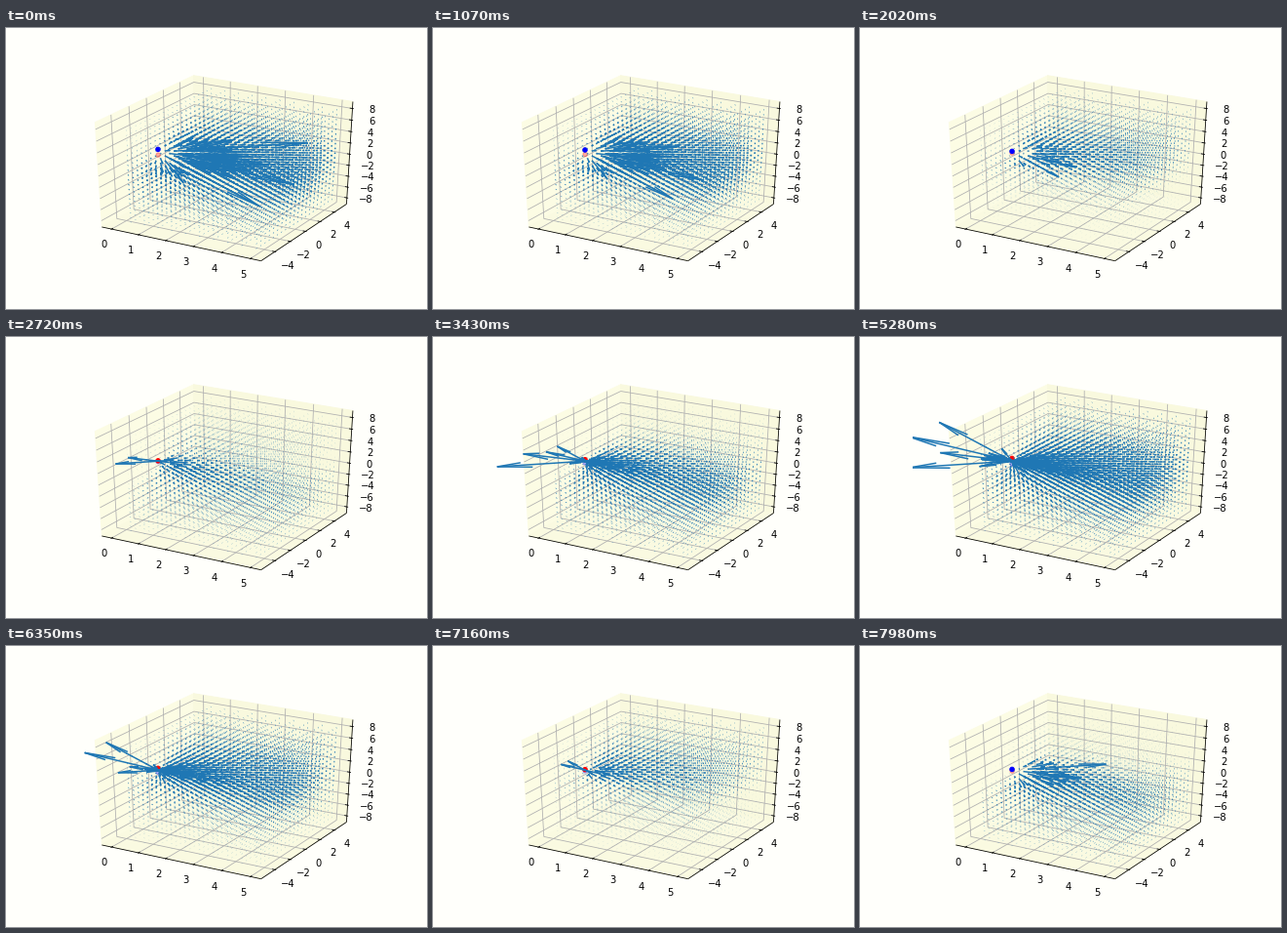
A matplotlib script for the animation above (8 s loop, 432 px wide and 288 px high).

```python
import numpy as np
import matplotlib.pyplot as plt
from matplotlib.animation import FuncAnimation
from matplotlib.collections import LineCollection
from matplotlib.patches import PathPatch, Polygon, Rectangle
from matplotlib.path import Path

W, H = 432, 288
FRAMES, STEP = 250, 32
PERIOD = 10000
BLUE = "#1f77b4"
PAPER = "#fffffb"
LOW = np.array([-0.25, -5.5, -8.8])
SPAN = np.array([5.5, 11.0, 17.6])
EDGE = 0.5 + 1 / 48
LABEL = EDGE + 0.0833
LEFT, BOTTOM, WIDE, TALL = 54, 252, 334.8, 217.44

ELEV, AZIM = np.radians([30, -60])
CE, SE, CA, SA = np.cos(ELEV), np.sin(ELEV), np.cos(AZIM), np.sin(AZIM)
RIGHT = np.array([-SA, CA, 0])
UP = np.array([-SE * CA, -SE * SA, CE])
NEAR = np.array([CE * CA, CE * SA, SE])


def project(p):
    """Unit-cube points, centred on zero, to stage pixels."""
    p = np.asarray(p, float)
    depth = 10 - p @ NEAR
    x = LEFT + WIDE * (p @ RIGHT / depth + 0.095) / 0.185
    y = BOTTOM - TALL * (p @ UP / depth + 0.095) / 0.185
    return np.stack([x, y], -1)


def to_cube(p):
    return (np.asarray(p, float) - LOW) / SPAN - 0.5


def point(axis, value, first, second):
    """A cube point with value on axis and the rest in order."""
    p = [first, second]
    p.insert(axis, value)
    return p


fig = plt.figure(figsize=(W / 72, H / 72), dpi=72, facecolor=PAPER)
ax = fig.add_axes([0, 0, 1, 1])
ax.set_xlim(0, W)
ax.set_ylim(H, 0)
ax.axis("off")

E = EDGE
panes = [
    ([(-E, -E, -E), (-E, E, -E), (-E, E, E), (-E, -E, E)], "#fcfce4"),
    ([(-E, E, -E), (E, E, -E), (E, E, E), (-E, E, E)], "#f9f9de"),
    ([(-E, -E, -E), (E, -E, -E), (E, E, -E), (-E, E, -E)], "#fafae1"),
]
for corners, tone in panes:
    ax.add_patch(Polygon(project(corners), fc=tone, ec=tone, lw=1, zorder=0))

# per axis: tick values, fixed edge, far corner of the grid, tick direction
axes3d = [
    (range(0, 6), (-E, -E), [(E, -E), (E, E)], 1),
    (range(-4, 5, 2), (E, -E), [(-E, -E), (-E, E)], 0),
    (range(-8, 9, 2), (E, E), [(-E, E), (-E, -E)], 0),
]
grid, ticks = [], []
for k, (values, edge, far, tick_dir) in enumerate(axes3d):
    ticks.append(project([point(k, -E, *edge), point(k, E, *edge)]))
    for v in values:
        c = (v - LOW[k]) / SPAN[k] - 0.5
        base = point(k, c, *edge)
        grid.append(project([base] + [point(k, c, *f) for f in far]))
        inner, outer = list(base), list(base)
        side = np.sign(base[tick_dir])
        inner[tick_dir] -= side * 0.2 / 12
        outer[tick_dir] += side * 0.1 / 12
        ticks.append(project([inner, outer]))
        x, y = project(point(k, c, *(np.sign(edge) * LABEL)))
        ax.text(x, y + 3.3, str(v).replace("-", "\u2212"), size=10,
                family="DejaVu Sans", ha="center", va="center")
ax.add_collection(LineCollection(grid, colors="#b0b0b0", lw=0.8, zorder=1))
ax.add_collection(LineCollection(ticks, colors="k", lw=0.8, zorder=2))

# lattice of arrow bases
base = np.stack(np.meshgrid(np.linspace(0.5, 5, 10), np.linspace(-5, 5, 20),
                            np.linspace(-8, 8, 20), indexing="ij"), -1).reshape(-1, 3)
dist = np.linalg.norm(base, axis=1)
unit = base / dist[:, None]
rise = unit[:, 2]
decay = np.exp(0.7 - dist)
lag = 0.1 * decay + rise * (0.85 * decay - 0.5)
reach = 2.88 / dist ** 2 * (1 + 0.11 * rise * decay)
base_px = project(to_cube(base))
flat = np.hypot(unit[:, 0], unit[:, 1])
turn = np.stack([-unit[:, 0] * rise / flat, -unit[:, 1] * rise / flat, flat], -1)
C15, S15 = np.cos(np.pi / 12), np.sin(np.pi / 12)

clip = Rectangle((LEFT, BOTTOM - TALL), WIDE, TALL, transform=ax.transData)
CHUNKS = 16
strokes = []
for _ in range(CHUNKS):
    stroke = PathPatch(Path([(0, 0), (0, 0)]), fill=False, ec=BLUE, lw=1.5, zorder=4)
    ax.add_patch(stroke)
    stroke.set_clip_path(clip)
    strokes.append(stroke)
dots = ax.scatter([0, 0], [0, 0], s=20, lw=1, zorder=3)


def segments(theta):
    size = (reach * np.cos(theta + lag))[:, None]
    tip = base + unit * size
    tip_px = project(to_cube(tip))
    big = np.hypot(*(tip_px - base_px).T) > 1.5
    parts = [np.stack([base_px, tip_px], 1)]
    for s in (S15, -S15):
        barb = tip[big] - 0.3 * size[big] * (unit[big] * C15 + turn[big] * s)
        parts.append(np.stack([tip_px[big], project(to_cube(barb))], 1))
    return np.concatenate(parts)


def update(i):
    theta = 2 * np.pi * i * STEP / PERIOD
    for stroke, seg in zip(strokes, np.array_split(segments(theta), CHUNKS)):
        codes = np.tile([Path.MOVETO, Path.LINETO], len(seg))
        stroke.set_path(Path(seg.reshape(-1, 2), codes))
    z = 0.5 * np.cos(theta)
    pair = [(z, (0, 0, 1)), (-z, (1, 0, 0))]
    pair.sort(key=lambda d: d[0])
    dots.set_offsets(project(to_cube([(0, 0, h) for h, _ in pair])))
    colors = [pair[0][1] + (0.3,), pair[1][1] + (1,)]
    dots.set_facecolor(colors)
    dots.set_edgecolor(colors)
    return [*strokes, dots]


anim = FuncAnimation(fig, update, frames=FRAMES, init_func=lambda: update(0),
                     interval=STEP, repeat=True, repeat_delay=0, blit=False)
plt.show()
```
